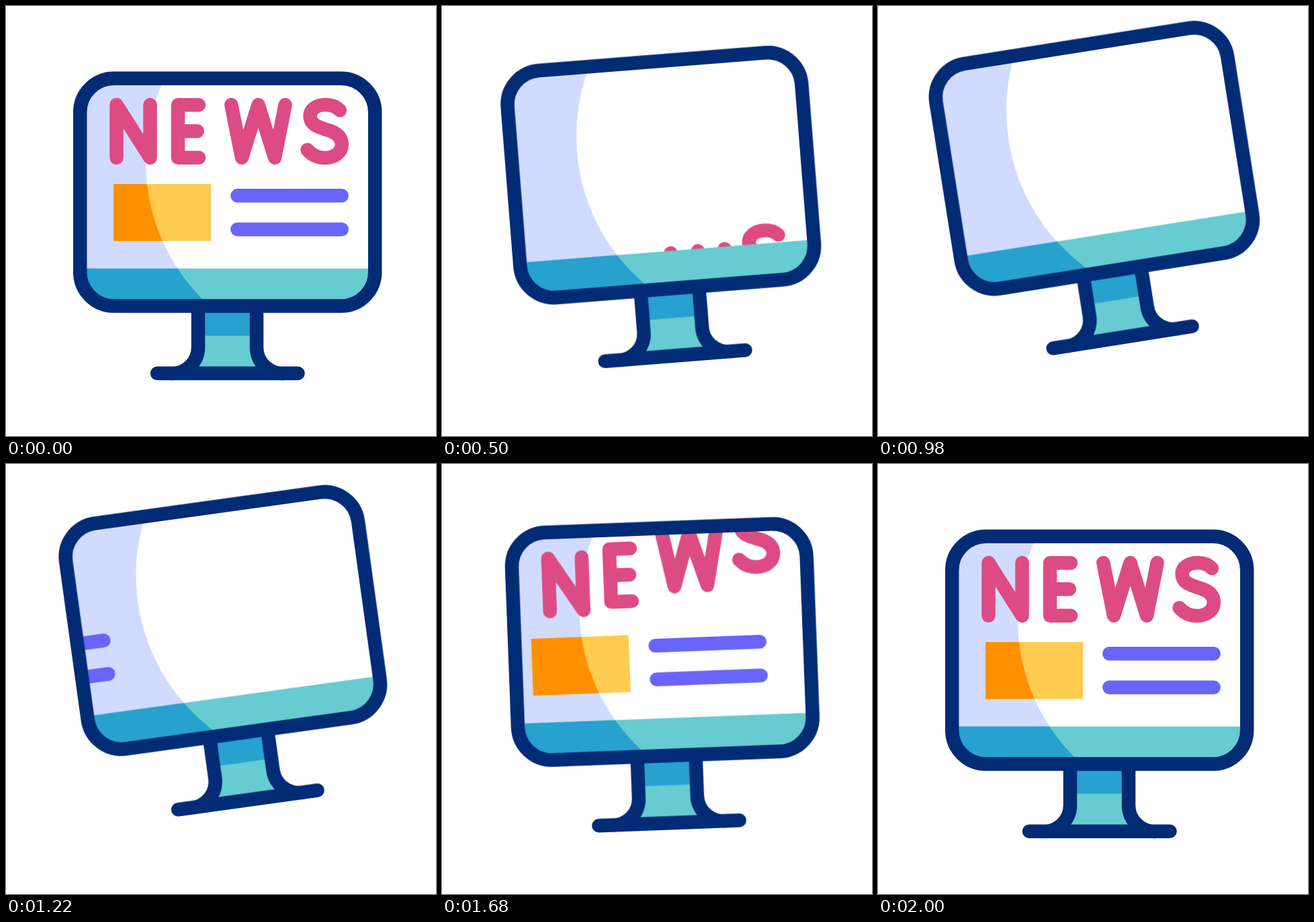
An HTML page without scripts for the animation above (2.02 s loop, 640 by 640 pixels).

```html
<!DOCTYPE html>
<html lang="en">
<head>
<meta charset="utf-8">
<title>News monitor</title>
<style>
html, body { margin: 0; width: 100%; height: 100%; overflow: hidden; background: #fff; }
svg { display: block; width: 100%; height: 100%; }

.navy { fill: none; stroke: #022b76; }
.pink { fill: none; stroke: #dd4b85; }
.violet { fill: none; stroke: #6964fa; }
.navy, .pink, .violet { stroke-width: 20.5px; stroke-linecap: round; stroke-linejoin: round; }

.tilt, .slide, .pink {
  animation: tilt 2020ms cubic-bezier(.333, 0, .667, 1) infinite;
}
.tilt { transform-origin: 329.5px 327px; }
.slide { animation-name: slide; }
.n { animation-name: n; }
.e { animation-name: e; }
.w { animation-name: w; }
.s { animation-name: s; }

@keyframes tilt {
  0%, 99.01%, 100% { transform: translateY(0) rotate(0deg); }
  49.505% { transform: translateY(-51px) rotate(-9deg); }
}
/* leave to the right, come back from the left */
@keyframes slide {
  0%, 89.01%, 100% { transform: translateX(0); }
  20.297%, 40% { transform: translateX(429px); }
  40.001%, 49.653% { transform: translateX(-429px); }
}
/* drop behind the bar, come back from above */
@keyframes n {
  0%, 83.663%, 100% { transform: translateY(0); }
  21.782%, 40% { transform: translateY(265px); }
  40.001%, 63.812% { transform: translateY(-265px); }
}
@keyframes e {
  0%, 4.109%, 85.941%, 100% { transform: translateY(0); }
  25.891%, 40% { transform: translateY(265px); }
  40.001%, 63.812% { transform: translateY(-265px); }
}
@keyframes w {
  0%, 6.485%, 88.416%, 100% { transform: translateY(0); }
  28.267%, 40% { transform: translateY(265px); }
  40.001%, 63.812% { transform: translateY(-265px); }
}
@keyframes s {
  0%, 8.416%, 91.287%, 100% { transform: translateY(0); }
  30.198%, 40% { transform: translateY(265px); }
  40.001%, 63.812% { transform: translateY(-265px); }
}
</style>
</head>
<body>
<svg viewBox="0 0 640 640" role="img" aria-label="NEWS">
  <defs>
    <rect id="panel" x="110.2" y="107.7" width="439" height="338.8" rx="50.5"/>
    <path id="dim" d="M100 100H239.8A290 290 0 0 0 306.8 450H100Z"/>
    <rect id="photo" x="160" y="265" width="145" height="84.7"/>
    <rect id="bar" x="100" y="390.7" width="460" height="60"/>
    <clipPath id="inside"><use href="#panel"/></clipPath>
    <clipPath id="shade"><use href="#dim"/></clipPath>
  </defs>

  <g class="tilt">
    <rect x="286" y="447" width="87" height="100" fill="#66ccd1"/>
    <rect x="286" y="447" width="87" height="43.6" fill="#27a1cd"/>
    <path class="navy" d="M286 447V508A39 39 0 0 1 247 547M373 447V508A39 39 0 0 0 412 547M225 546.8H434.5"/>

    <g clip-path="url(#inside)">
      <use href="#panel" fill="#fff"/>
      <use href="#dim" fill="#d1dbff"/>

      <path class="pink n" d="M164.5 225.8V147L214.5 225.8V147"/>
      <path class="pink e" d="M287 147.2H256V225.7H287M256 186.3H284.8"/>
      <path class="pink w" d="M335.3 147L351 225.7L375.5 147L400 225.7L415.6 147"/>
      <path class="pink s" d="M497 155.3C492 150 484 147 475.5 147C462 147 452.5 154 452.5 163.5C452.5 176 463 179.5 475 183.5C489 187 499.8 193 499.8 206C499.8 218 489 226 474.5 226C464 226 455 221.5 448.5 214"/>

      <g class="slide">
        <use href="#photo" fill="#ffcb50"/>
        <path class="violet" d="M344.3 282.2H499.7M344.3 332.4H499.7"/>
      </g>
      <g clip-path="url(#shade)">
        <use class="slide" href="#photo" fill="#ff9100"/>
      </g>

      <use href="#bar" fill="#66ccd1"/>
      <use href="#bar" fill="#27a1cd" clip-path="url(#shade)"/>
    </g>
    <use href="#panel" class="navy"/>
  </g>
</svg>
</body>
</html>
```
